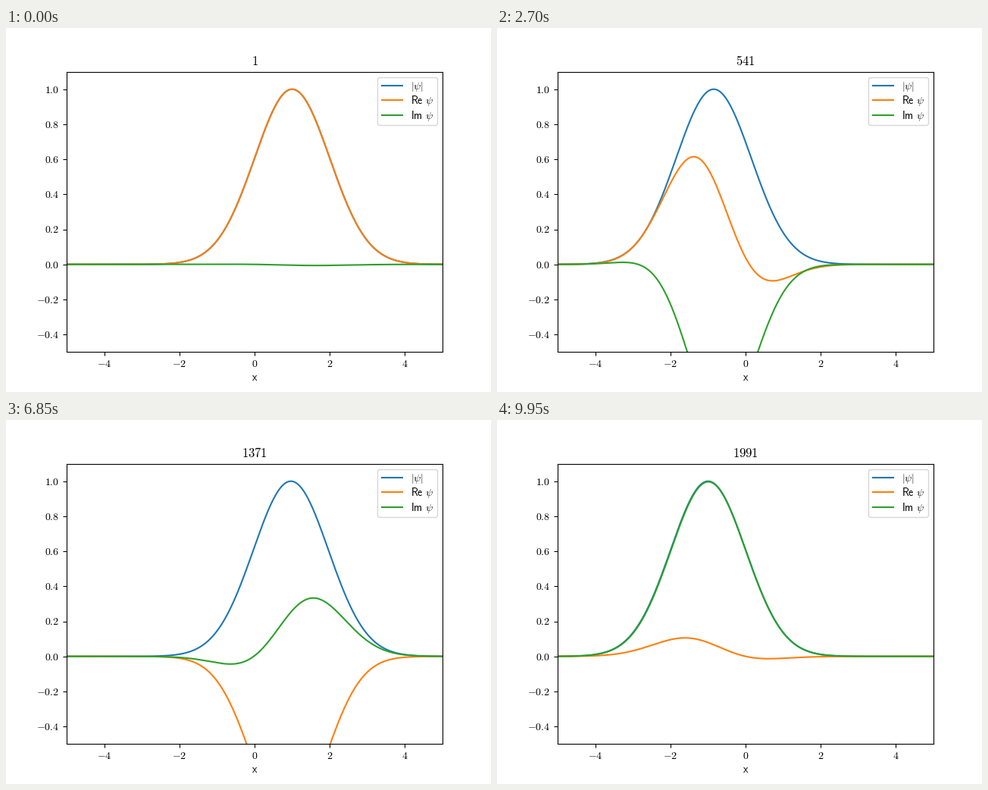
Write a matplotlib script that moves like this. It is 640 px wide and 480 px high and loops after 10000 ms.

```python
import numpy as np
import matplotlib.pyplot as plt
from matplotlib.animation import FuncAnimation
from matplotlib.lines import Line2D
from matplotlib.patches import FancyBboxPatch
from matplotlib.transforms import IdentityTransform

plt.rcParams["mathtext.fontset"] = "cm"
plt.rcParams["font.family"] = "Liberation Serif"

WIDTH, HEIGHT, DPI = 640, 480, 100
FRAMES, INTERVAL = 200, 50
STEPS_PER_FRAME = 10
DT = 0.0047735
COLORS = ["#1f77b4", "#ff7f0e", "#2ca02c"]
LABELS = [
    r"$|\psi|$",
    r"$\mathsf{Re}\hspace{0.38}\psi$",
    r"$\mathsf{Im}\hspace{0.38}\psi$",
]

x = np.linspace(-5, 5, 500)


def coherent_state(t):
    """Gaussian packet swinging in a harmonic well, released at x = 1."""
    envelope = np.exp(-(x - np.cos(t)) ** 2 / 2)
    phase = t / 2 + x * np.sin(t) - np.sin(2 * t) / 4
    return envelope * np.exp(-1j * phase)


def draw_legend(fig):
    """Legend laid out in pixels, with y measured from the top."""
    pixels = IdentityTransform()
    left, top, right, bottom = 490.0, 64.5, 569.06, 128.0
    fig.add_artist(FancyBboxPatch(
        (left, HEIGHT - bottom), right - left, bottom - top,
        boxstyle="round,pad=0,rounding_size=2.78", transform=pixels,
        facecolor="white", edgecolor="0.8", linewidth=1, alpha=0.8, snap=True))
    for row, (label, color) in enumerate(zip(LABELS, COLORS)):
        baseline = HEIGHT - (80.6 + 19.6 * row)
        y = baseline + 4.86
        fig.add_artist(Line2D([left + 5.6, left + 33.3], [y, y], color=color,
                              linewidth=1.5, transform=pixels))
        fig.text(left + 44.4, baseline, label, fontsize=10,
                 va="baseline", transform=pixels)


fig, ax = plt.subplots(figsize=(WIDTH / DPI, HEIGHT / DPI), dpi=DPI)
ax.set_xlim(-5, 5)
ax.set_ylim(-0.5, 1.1)
ax.set_xticks(range(-4, 5, 2))
ax.set_yticks([k / 5 for k in range(-2, 6)])
ax.xaxis.set_major_formatter(lambda v, _: f"${v:.0f}$")
ax.yaxis.set_major_formatter(lambda v, _: f"${v:.1f}$")
ax.set_xlabel(r"$\mathsf{x}$")
title = ax.set_title("", fontsize=12)
curves = [ax.plot(x, 0 * x, color=c, linewidth=1.5)[0] for c in COLORS]
draw_legend(fig)


def update(frame):
    step = STEPS_PER_FRAME * frame + 1
    psi = coherent_state(step * DT)
    for curve, y in zip(curves, (np.abs(psi), psi.real, psi.imag)):
        curve.set_ydata(y)
    title.set_text(rf"$\mathsf{{{step}}}$")
    return [*curves, title]


anim = FuncAnimation(fig, update, frames=FRAMES, interval=INTERVAL, repeat=True)
plt.show()
```
